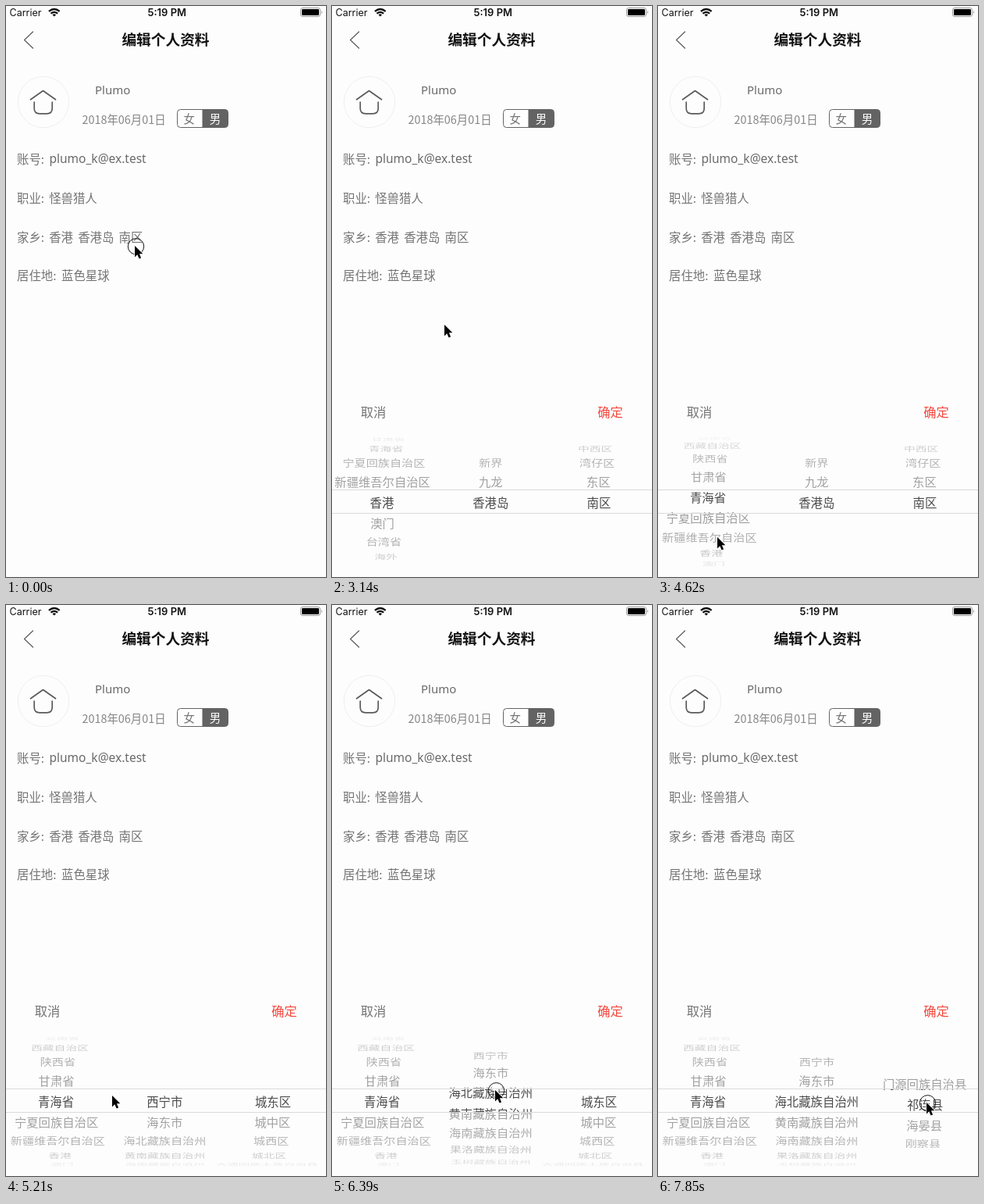
An HTML page for the animation above (8000 ms loop, 410 by 731 pixels).

```html
<!DOCTYPE html>
<html lang="zh-CN">
<head>
<meta charset="utf-8">
<title>编辑个人资料</title>
<style>
  html, body { margin: 0; width: 100%; height: 100%; overflow: hidden; background: #fdfdfd; }
  svg { display: block; width: 410px; height: 731px; }
  text { font-family: "Noto Sans CJK SC", "Noto Sans CJK", "Noto Sans", sans-serif; font-size: 15.4px; fill: #747474; }
  .bar { font-family: Inter, Roboto, sans-serif; font-size: 13px; fill: #111; }
  .mid { text-anchor: middle; }
  .latin { font-family: "Noto Sans", sans-serif; font-size: 15px; font-weight: 500; fill: #6a6a6a; }
  .wheel text { text-anchor: middle; fill: #9a9a9a; }
  .band text { fill: #4c4c4c; }
  .line { fill: none; stroke: #5a5a5a; stroke-linecap: round; stroke-linejoin: round; }
</style>
</head>
<body>
<svg viewBox="0 0 410 731">
  <defs>
    <clipPath id="outside"><path d="M0 550H410V619.5H0zM0 650H410V719H0z"/></clipPath>
    <clipPath id="inside"><path d="M0 619.5H410V650H0z"/></clipPath>
  </defs>

  <text class="bar" x="4.5" y="13" style="font-size:12.5px">Carrier</text>
  <g fill="none" stroke="#111" stroke-width="2.2">
    <path d="M54.9 6.9Q61.8 1.1 68.7 6.9M57.4 9.7Q61.8 6 66.2 9.7"/>
    <path d="M59.5 11.2Q61.8 9.5 64.1 11.2L61.8 13.6z" fill="#111" stroke="none"/>
  </g>
  <text class="bar mid" x="206.3" y="13" font-weight="600">5:19 PM</text>
  <rect x="377.5" y="2.5" width="25" height="11" rx="2.6" fill="none" stroke="#999"/>
  <rect x="379" y="4" width="22" height="8" rx="1.3"/>
  <path d="M404 6Q406.2 8 404 10z" fill="#999"/>

  <path class="line" d="M34.5 33L23.5 43.5L34.5 54" stroke-width="1.2"/>
  <text class="mid" x="204.5" y="50.3" style="font-size:18.7px;font-weight:700;fill:#111">编辑个人资料</text>

  <circle cx="48" cy="123" r="32.7" fill="none" stroke="#efefef"/>
  <path class="line" d="M31.5 119.8L47.5 108.5L63.5 119.8M36.2 123V131Q36.2 137.8 43 137.8H52.4Q59.2 137.8 59.2 131V123" stroke-width="1.7"/>
  <text class="latin" x="114" y="113">Plumo</text>
  <text x="97.5" y="150.5" style="font-size:14.4px;fill:#858585">2018年06月01日</text>
  <path d="M251.5 132.5H280.5Q284.5 132.5 284.5 136.5V151.5Q284.5 155.5 280.5 155.5H251.5z" fill="#636363"/>
  <rect x="219.5" y="132.5" width="65" height="23" rx="4" fill="none" stroke="#636363"/>
  <text class="mid" x="234.7" y="149.6" style="font-size:14.5px">女</text>
  <text class="mid" x="268" y="149.6" style="font-size:14.5px;fill:#fdfdfd">男</text>

  <text x="14" y="202">账号:</text>
  <text class="latin" x="55.5" y="201" style="font-size:15.5px">plumo_k@ex.test</text>
  <text x="14" y="251.8">职业:</text><text x="55.2" y="251.8">怪兽猎人</text>
  <text x="14" y="301.8">家乡:</text><text x="55.2" y="301.8">香港</text><text x="92.2" y="301.8">香港岛</text><text x="144.5" y="301.8">南区</text>
  <text x="14" y="351.3">居住地:</text><text x="71" y="351.3">蓝色星球</text>

  <g id="picker">
    <text x="36.7" y="526" style="font-size:16.3px">取消</text>
    <text x="340.2" y="526" style="font-size:16.3px;fill:#f4483e">确定</text>
    <g id="wheel" class="wheel" clip-path="url(#outside)"></g>
    <g id="band" class="wheel band" clip-path="url(#inside)"></g>
    <path d="M0 619.5H410M0 649.5H410" stroke="#dadada"/>
  </g>

  <g id="cursor">
    <circle id="ring" cx="1.5" cy=".8" r="10.2" fill="none" stroke="#111"/>
    <path d="M0 0V14.4L3.3 11.3L5.6 16.6L8.1 15.5L5.9 10.3H10.3z" stroke="#fff" stroke-width="1.6" paint-order="stroke"/>
  </g>
</svg>

<script>
const $ = id => document.getElementById(id);
const LOOP = 8000, TICK = 148, LAST = 53;
const OPEN = 18, CITY = 33, AREA = 47;   // ticks of hard changes
const RADIUS = 84, STEP = 18.4 * Math.PI / 180, CENTER = 635.7;
const COLUMN_X = [64, 203.3, 342];

const list = names => names.split(' ');
const provinces = list('贵州省 云南省 西藏自治区 陕西省 甘肃省 青海省 宁夏回族自治区 新疆维吾尔自治区 香港 澳门 台湾省 海外');
const hkParts = list('新界 九龙 香港岛');
const hkAreas = list('中西区 湾仔区 东区 南区');
const cities = list('西宁市 海东市 海北藏族自治州 黄南藏族自治州 海南藏族自治州 果洛藏族自治州 玉树藏族自治州 海西蒙古族藏族自治州');
const xining = list('城东区 城中区 城西区 城北区 大通回族土族自治县');
const haibei = list('门源回族自治县 祁连县 海晏县 刚察县');

// Tracks: [tick, ...values]
const pointer = [
  [0, 165, 307], [1, 156.5, 297], [6, 156.5, 297], [7, 155, 297], [8, 153, 297], [20, 153, 297],
  [21, 144, 408], [24, 96, 598], [25, 94, 602], [30, 76, 680], [32, 76, 680],
  [35, 136, 628], [36, 136, 630], [39, 202, 684], [43, 209, 621], [45, 209, 621],
  [50, 343, 658], [51, 343, 659], [52, 344, 646], [53, 344, 637]
];
const province = [[25, 8], [30, 5.4], [31, 5.25], [32, 5]];
const city = [[39, 0], [43, 2.43], [44, 2.43], [46, 2]];
const area = [[51, 0], [52, .5], [53, .84]];
const presses = [[0, 0], [17, 17], [25, 29], [39, 44], [51, 53]];

function at(track, n) {
  const i = track.findIndex(row => row[0] > n);
  if (i === 0) return track[0].slice(1);
  if (i < 0) return track[track.length - 1].slice(1);
  const a = track[i - 1], b = track[i], k = (n - a[0]) / (b[0] - a[0]);
  return a.slice(1).map((v, j) => v + (b[j + 1] - v) * k);
}

function makeRows(parent) {
  return COLUMN_X.map(() => Array.from({ length: 12 }, () =>
    parent.appendChild(document.createElementNS('http://www.w3.org/2000/svg', 'text'))));
}
const layers = [makeRows($('wheel')), makeRows($('band'))];

function drawColumn(col, names, pos) {
  layers.forEach((layer, dark) => layer[col].forEach((el, i) => {
    const angle = (i - pos) * STEP;
    const cos = Math.cos(angle);
    const shown = i < names.length && Math.abs(angle) < 1.5;
    el.style.display = shown ? '' : 'none';
    if (!shown) return;
    const scale = 1 / (1 + .085 * (1 - cos));
    const x = 205 + (COLUMN_X[col] - 205) * scale;
    const y = CENTER + RADIUS * Math.sin(angle);
    el.textContent = names[i];
    el.setAttribute('y', 5.85);
    el.setAttribute('transform', `translate(${x} ${y}) scale(${scale} ${scale * cos})`);
    el.setAttribute('opacity', dark ? 1 : cos ** 1.3);
  }));
}

function draw(n) {
  const [x, y] = at(pointer, n);
  $('cursor').setAttribute('transform', `translate(${x} ${y})`);
  $('ring').style.display = presses.some(([a, b]) => n >= a && n <= b) ? '' : 'none';
  $('picker').style.display = n < OPEN ? 'none' : '';
  const early = n < CITY;
  drawColumn(0, provinces, at(province, n)[0]);
  drawColumn(1, early ? hkParts : cities, early ? 2 : at(city, n)[0]);
  drawColumn(2, early ? hkAreas : n < AREA ? xining : haibei, early ? 3 : at(area, n)[0]);
}

const start = performance.now();
let shown = -1;
function frame() {
  const t = (performance.now() - start) % LOOP;
  const n = Math.min(LAST, Math.floor(t / TICK));
  if (n !== shown) draw(shown = n);
  requestAnimationFrame(frame);
}
frame();
</script>
</body>
</html>
```
